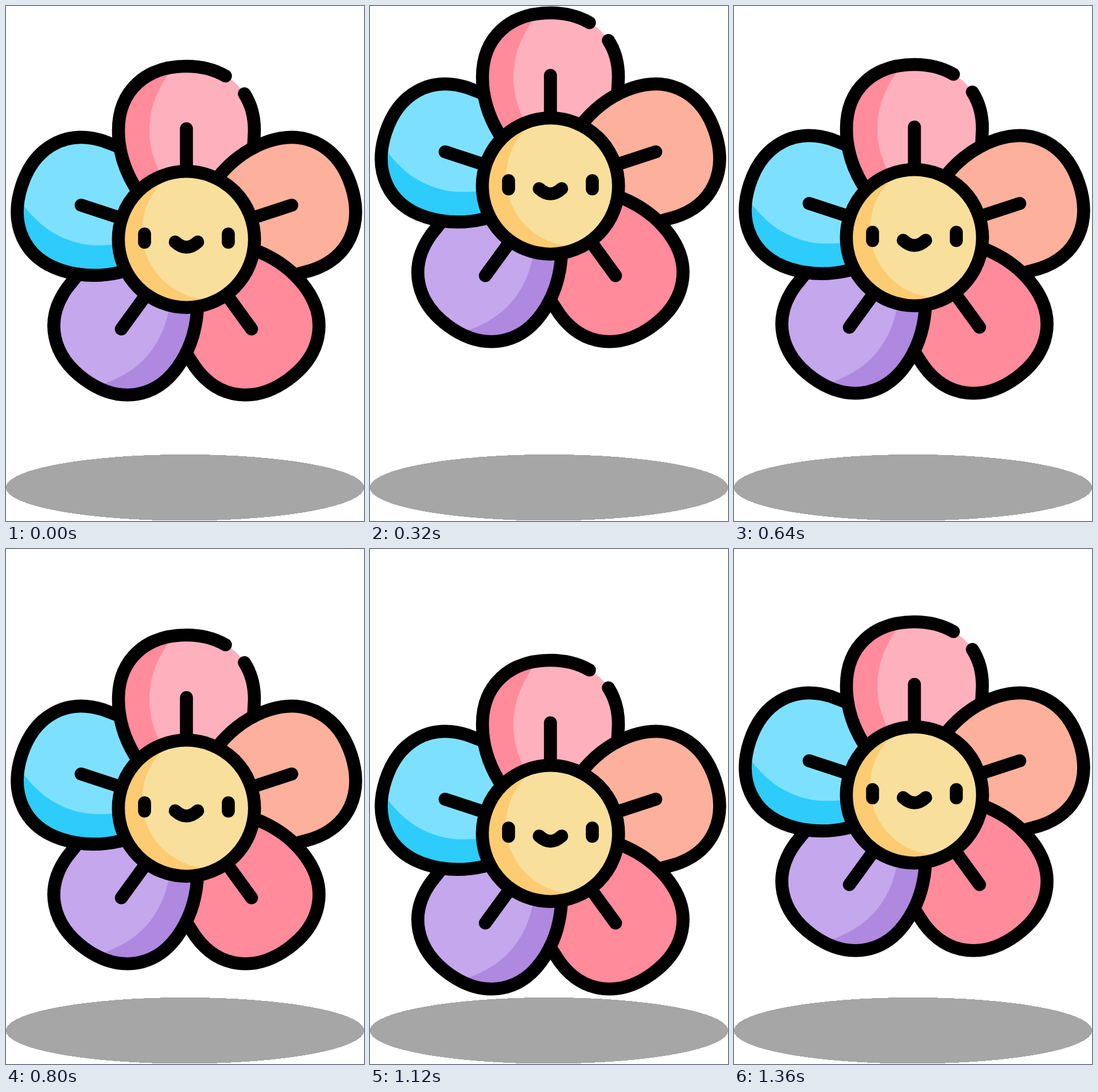
Recreate the animation shown at these times as an HTML page. Size 624 by 898 pixels, loop 1440 ms.

```html
<!DOCTYPE html>
<html lang="en">
<head>
<meta charset="utf-8">
<title>Bouncing flower</title>
<style>
  html, body { margin: 0; width: 100%; height: 100%; overflow: hidden; background: #fff; }
  svg { display: block; width: 624px; height: 898px; }
  .ink { fill: none; stroke: #000; stroke-width: 22.6; stroke-linecap: round; }
</style>
</head>
<body>
<svg viewBox="0 0 624 898">
  <ellipse cx="312" cy="839.7" rx="312.3" ry="57.8" fill="#a6a6a6" shape-rendering="crispEdges"/>
  <g id="flower">
    <g id="fills"></g>
    <g id="outlines" class="ink"></g>
    <circle r="118.7" fill="#fccb72"/>
    <path fill="#f8df9c" d="M-39-103A120 120 0 0 0 40 105A112 112 0 1 0-39-103Z"/>
    <circle r="118.7" class="ink"/>
    <path class="ink" d="M-73-9.5V5M73-9.5V5M-19.5 4.5Q0 22.5 19.5 4.5"/>
  </g>
</svg>
<script>
const $ = id => document.getElementById(id);

// Petal geometry, pointing up from the flower's centre
const left = 'M-90-92C-108-122-118.5-155-118.5-190C-118.5-260-70-302 0-302';
const right = 'C70-302 118.5-260 118.5-190L117-160';
const base = 'L60-114L0 0Z';
const lit = `M-45-112C-57-138-64.5-160-64.5-190C-64.5-232-50-262-24-300L0-302${right}${base}`;
const gapped = 'C26-302 49-296 68-285M101-254C112-237 118.5-215 118.5-190L117-160';
const vein = 'M0-193V-120';

// Main colour and lit colour, clockwise from the top
const petals = [
  ['#ff8b9b', '#ffb0bd'],
  ['#fdb09b'],
  ['#ff8b9b'],
  ['#af88e0', '#c4a7ec'],
  ['#2dccfa', '#7ee0ff'],
];

petals.forEach(([main, light], i) => {
  const path = (d, fill) =>
    `<path transform="rotate(${72 * i})" d="${d}" fill="${fill}"/>`;
  $('fills').innerHTML += path(left + right + base, main) + (light ? path(lit, light) : '');
  $('outlines').innerHTML += path(left + (i ? right : gapped) + vein, 'none');
});

// Vertical offsets at [step, y]; linear between keys, held for one step
const STEP = 80, STEPS = 18;
const keys = [[0, 0], [2, -56.3], [4, -93], [6, -47.8], [8, -3], [10, 45],
  [13, 111], [14, 89], [17, 22], [18, 0]];

function offset(step) {
  const next = keys.findIndex(([s]) => s > step);
  const [s0, y0] = keys[next - 1], [s1, y1] = keys[next];
  return y0 + (y1 - y0) * (step - s0) / (s1 - s0);
}

function draw() {
  const step = Math.floor(performance.now() / STEP) % STEPS;
  $('flower').setAttribute('transform', `translate(314.5 ${407 + offset(step)})`);
  requestAnimationFrame(draw);
}
draw();
</script>
</body>
</html>
```
